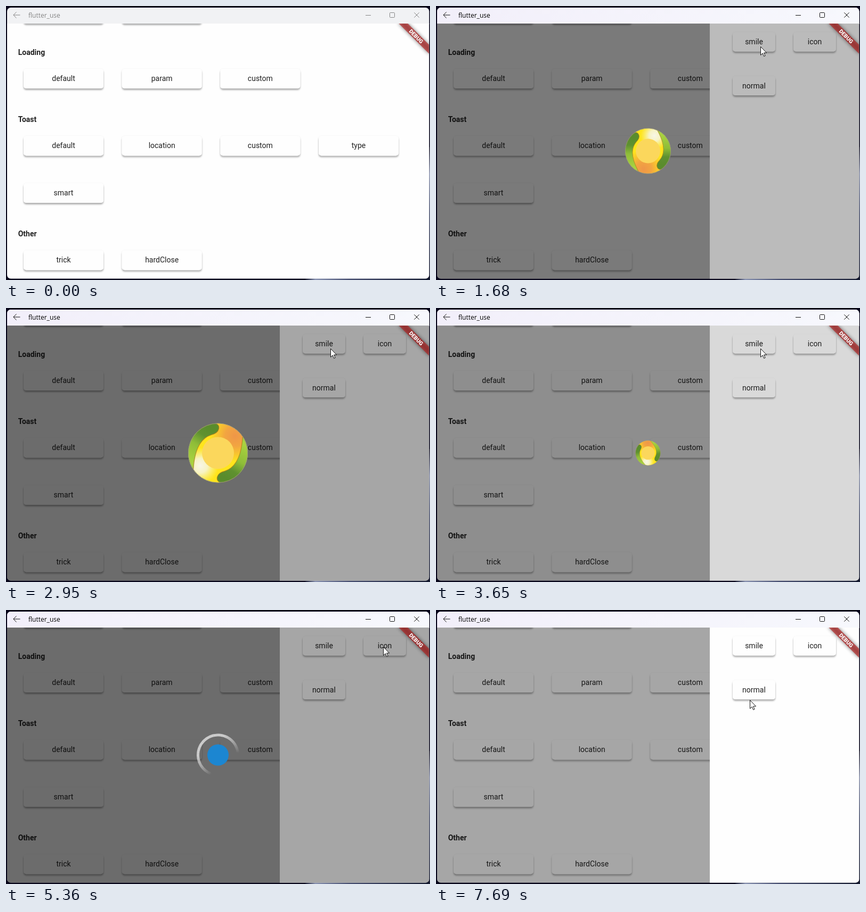
These frames come from a looping animation (796 by 515 pixels, 8 s). An HTML page:

```html
<!DOCTYPE html>
<html lang="en">
<head>
<meta charset="utf-8">
<title>flutter_use</title>
<style>
  html, body { margin: 0; width: 100%; height: 100%; overflow: hidden; background: #07051a; }
  svg { display: block; width: 796px; height: 515px; }
  text { font: 14px Roboto, sans-serif; fill: #212121; }
  .head { font-weight: 700; }
  .label { text-anchor: middle; }
  .title { font: 12px "Open Sans", sans-serif; }
  .banner { font-size: 10.2px; font-weight: 900; fill: #fff; text-anchor: middle; }
</style>
</head>
<body>
<svg id="stage" viewBox="0 0 796 515" xmlns="http://www.w3.org/2000/svg">
  <defs>
    <linearGradient id="bar">
      <stop offset="0" stop-color="#f2effa"/><stop offset="1" stop-color="#f7f8fd"/>
    </linearGradient>
    <linearGradient id="sky" x1="0" y1="0" x2="0" y2="1">
      <stop offset="0" stop-color="#1c1a2c"/><stop offset=".2" stop-color="#8d95b0"/>
      <stop offset=".5" stop-color="#4a5270"/><stop offset="1" stop-color="#1d2136"/>
    </linearGradient>
    <linearGradient id="glow">
      <stop offset="0" stop-color="#10122a"/><stop offset=".08" stop-color="#8690b0"/>
      <stop offset=".35" stop-color="#454d70"/><stop offset="1" stop-color="#141a30"/>
    </linearGradient>
    <linearGradient id="leaf" gradientUnits="userSpaceOnUse" x1="-52" y1="15" x2="-14" y2="-46">
      <stop offset="0" stop-color="#a9d23f"/><stop offset=".45" stop-color="#8fbd38"/>
      <stop offset=".75" stop-color="#5f9130"/><stop offset="1" stop-color="#5a8c2c"/>
    </linearGradient>
    <radialGradient id="orange" gradientUnits="userSpaceOnUse" cx="32" cy="-32" r="48">
      <stop offset="0" stop-color="#ef9648"/><stop offset=".4" stop-color="#f2a541"/>
      <stop offset="1" stop-color="#f2a541" stop-opacity="0"/>
    </radialGradient>
    <radialGradient id="pale" gradientUnits="userSpaceOnUse" cx="-33" cy="24" r="34">
      <stop offset="0" stop-color="#f8f6e6"/><stop offset=".4" stop-color="#f7f3c4"/>
      <stop offset="1" stop-color="#f7f0a0" stop-opacity="0"/>
    </radialGradient>
    <filter id="shade" x="-20%" y="-40%" width="140%" height="200%">
      <feDropShadow dx="0" dy="3" stdDeviation="1.7" flood-opacity=".27"/>
      <feDropShadow dx="0" dy=".5" stdDeviation="1" flood-opacity=".1"/>
    </filter>
    <filter id="blur" x="-30%" y="-150%" width="160%" height="400%"><feGaussianBlur stdDeviation="3.9"/></filter>
    <clipPath id="win"><rect x="2" y="3" width="792.5" height="509.5" rx="7"/></clipPath>
    <clipPath id="view"><rect x="2" y="33" width="792.5" height="480"/></clipPath>
    <clipPath id="disc"><circle r="56"/></clipPath>
    <path id="band" d="M-52 27A58 58 0 0 1 -7 -56Q3 -54 1 -45Q-1 -37 -13 -34C-31 -28 -44 -10 -46 31Z"
      fill="url(#leaf)" stroke="#a87a1c" stroke-width="1.2" stroke-opacity=".75"/>
  </defs>

  <rect width="796" height="515" fill="#07051a"/>
  <rect x="794" y="265" width="2" height="250" fill="url(#sky)"/>
  <rect x="562" y="512" width="234" height="3" fill="url(#glow)"/>

  <g clip-path="url(#win)">
    <rect x="2" y="3" width="793" height="31" fill="#f1f2f4"/>
    <rect id="active" x="2" y="3" width="793" height="31" fill="url(#bar)"/>
    <g id="chrome" fill="none">
      <path d="M26.5 17H14M19.5 11.3L13.8 17L19.5 22.7M675 17.5H685M766.3 12.3L775.7 21.7M775.7 12.3L766.3 21.7"/>
      <rect x="720.5" y="12.5" width="9" height="9" rx="1"/>
      <text id="name" class="title" x="42" y="21.5" stroke="none">flutter_use</text>
    </g>
    <g clip-path="url(#view)">
      <rect x="2" y="33" width="793" height="480" fill="#fefefe"/>
      <g id="page"></g>
      <rect id="hover" x="402.3" y="118" width="150" height="37" rx="5" opacity="0"/>
      <rect id="dim" x="2" y="33" width="793" height="480"/>
      <g id="drawer"><rect y="33" width="281" height="480" fill="#fefefe"/></g>
      <rect id="mask" x="2" y="33" width="793" height="480"/>
      <g id="smile">
        <g id="swirl">
          <g clip-path="url(#disc)">
            <circle r="56" fill="#ffe51c"/>
            <circle r="56" fill="url(#orange)"/>
            <circle r="56" fill="url(#pale)"/>
            <use href="#band"/>
            <use href="#band" transform="rotate(180)"/>
          </g>
          <circle r="55.6" fill="none" stroke="#9a9a80" stroke-width=".9"/>
        </g>
        <circle r="30" fill="#fbd75c"/>
      </g>
      <g id="spin">
        <g id="ring" fill="none" stroke="#fff" stroke-width="5"></g>
        <circle r="20" fill="#1c86d1"/>
      </g>
      <g transform="translate(794 33) rotate(45)">
        <rect x="-40" y="28" width="80" height="12" opacity=".5" filter="url(#blur)"/>
        <rect x="-40" y="28" width="80" height="12" fill="#b71c1c" fill-opacity=".63"/>
        <text class="banner" y="37.6">DEBUG</text>
      </g>
    </g>
  </g>
  <circle id="press" r="13" fill="#fdf200" opacity=".7"/>
  <path id="cursor" d="M.5 .5V16.3L4.2 12.9L6.7 18.6L9.1 17.5L6.6 12H11.6Z" fill="#fff" stroke="#111"/>
</svg>
<script>
const $ = id => document.getElementById(id);
const LOOP = 8000, TURN = 800, SLIDE = 260, DIM = 0.35;

const button = (x, y, w, h, label) =>
  `<rect x="${x}" y="${y}" width="${w}" height="${h}" rx="5" fill="#fefefe" filter="url(#shade)"/>
   <text class="label" x="${x + w / 2}" y="${y + h / 2 + 4.5}">${label}</text>`;
const row = (y, labels) =>
  labels.map((label, i) => button(33 + 184.67 * i, y, 150, 37, label)).join("");
const head = (y, label) => `<text class="head" x="22.7" y="${y}">${label}</text>`;

$("page").innerHTML =
  row(-4, ["", ""]) +
  head(92, "Loading") + row(118, ["default", "param", "custom"]) +
  head(218, "Toast") + row(244.3, ["default", "location", "custom", "type"]) + row(333, ["smart"]) +
  head(433, "Other") + row(459.2, ["trick", "hardClose"]);

$("drawer").innerHTML +=
  button(43, 49.4, 80, 36, "smile") + button(157, 49.4, 80, 36, "icon") + button(43, 132, 80, 36, "normal");

// Open ring that fades out at both ends
const point = deg => {
  const a = deg * Math.PI / 180;
  return `${(37.5 * Math.cos(a)).toFixed(2)} ${(37.5 * Math.sin(a)).toFixed(2)}`;
};
for (let i = 0; i < 60; i++) {
  const a = -130 + i * 4.1;
  const fade = Math.min(1, 1.3 * Math.sin(Math.PI * (i + 0.5) / 60));
  $("ring").innerHTML += `<path d="M${point(a)}A37.5 37.5 0 0 1 ${point(a + 4.2)}" stroke-opacity="${(0.66 * fade).toFixed(2)}"/>`;
}

// Cursor stops: time, x, y
const track = [
  [0, 800, 520], [520, 506, 152], [780, 506, 152], [900, 554, 120], [1120, 609, 76],
  [4220, 609, 76], [4580, 708, 69], [7240, 708, 69], [7690, 589, 169], [LOOP, 589, 169]
];
const presses = [[570, 730], [1320, 1480], [3400, 3510], [4620, 4800], [6760, 6830]];

const clamp = v => Math.max(0, Math.min(1, v));
const ramp = (t, start) => clamp((t - start) / SLIDE);
const smooth = p => p * p * (3 - 2 * p);

function cursorAt(t) {
  const i = track.findIndex(stop => stop[0] > t);
  const [t0, x0, y0] = track[i - 1], [t1, x1, y1] = track[i];
  const linear = (t - t0) / (t1 - t0);
  const p = t0 === 780 || t0 === 900 ? linear : smooth(linear);
  return [x0 + (x1 - x0) * p, y0 + (y1 - y0) * p];
}

function dialog(id, part, scale, angle) {
  $(id).setAttribute("visibility", scale > 0 ? "visible" : "hidden");
  $(id).setAttribute("transform", `translate(398 272.5) scale(${scale})`);
  $(part).setAttribute("transform", `rotate(${angle % 360})`);
}

function draw(t) {
  const active = t >= 560;
  $("active").setAttribute("visibility", active ? "visible" : "hidden");
  $("chrome").setAttribute("stroke", active ? "#111" : "#858585");
  $("name").style.fill = active ? "#000" : "#858585";

  const open = ramp(t, 733);
  $("drawer").setAttribute("transform", `translate(${794 - 280 * open} 0)`);
  $("dim").setAttribute("opacity", DIM * open);
  $("hover").setAttribute("opacity", t > 400 && t < 1000 ? 0.03 : 0);

  const smile = ramp(t, 1482) - ramp(t, 3500);
  const spin = ramp(t, 4817) - ramp(t, 6800);
  $("mask").setAttribute("opacity", DIM * Math.max(smile, spin));
  dialog("smile", "swirl", smile, (t - 2950) / TURN * 360);
  dialog("spin", "ring", spin, (t - 6430) / TURN * 360);

  const [x, y] = cursorAt(t);
  $("cursor").setAttribute("transform", `translate(${x} ${y})`);
  $("press").setAttribute("transform", `translate(${x} ${y})`);
  $("press").setAttribute("visibility", presses.some(([a, b]) => t >= a && t < b) ? "visible" : "hidden");
}

const start = performance.now();
function tick() {
  draw((performance.now() - start) % LOOP);
  requestAnimationFrame(tick);
}
tick();
</script>
</body>
</html>
```
